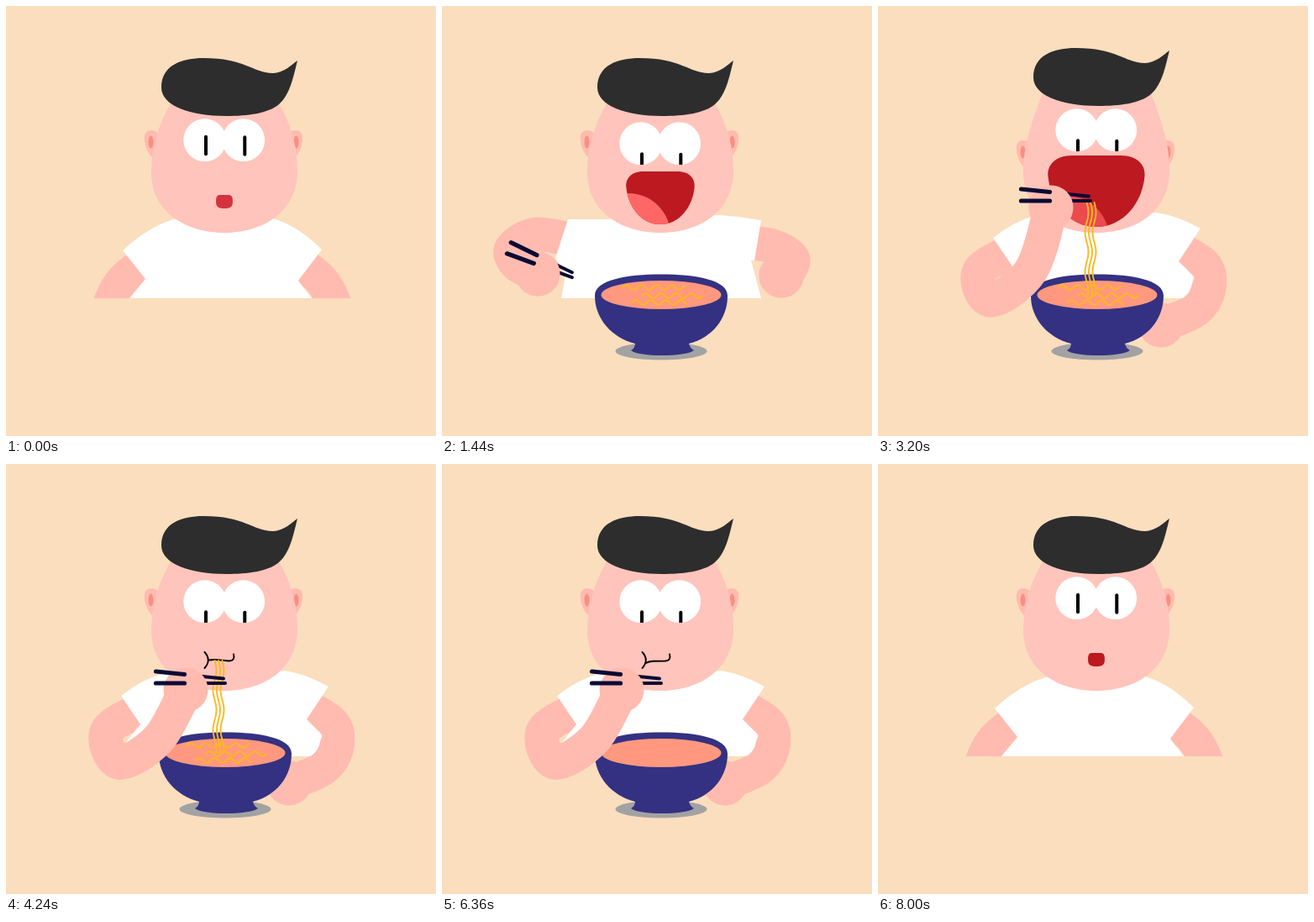
These frames come from a looping animation (512 by 512 pixels, 8.04 s). An HTML page with a canvas:

```html
<!DOCTYPE html>
<html lang="en">
<head>
<meta charset="utf-8">
<title>Noodle lunch</title>
<style>
html, body { margin: 0; width: 100%; height: 100%; overflow: hidden; background: #fadebd; }
canvas { display: block; width: 100vmin; height: 100vmin; }
</style>
</head>
<body>
<canvas id="stage"></canvas>
<script>
const SIZE = 512, LOOP = 8040, TABLE = 348;
const canvas = document.getElementById('stage');
const scale = window.devicePixelRatio || 1;
canvas.width = canvas.height = SIZE * scale;
const c = canvas.getContext('2d');

const SKIN = '#ffbbb0', FACE = '#ffc4bb', NOODLE = '#fcb91f', STICK = '#0b0a35';

// Arm poses: shoulder, three points round the elbow, hand
const LEFT = {
  rest: [187,292, 141,325, 121,362, 112,395, 112,422],
  out: [160,280, 112,272, 83,289, 90,308, 114,319],
  dip: [174,286, 108,320, 114,352, 160,360, 207,342],
  lift: [174,286, 121,315, 134,350, 182,315, 206,240],
  chew: [174,286, 121,317, 134,355, 181,328, 214,269]
};
const RIGHT = {
  rest: [328,292, 374,325, 394,362, 403,395, 403,422],
  out: [352,280, 393,286, 416,299, 415,312, 404,321],
  hold: [348,284, 388,308, 394,335, 378,362, 337,380]
};
// Shirt: neck, sleeve top, sleeve bottom, armpit, hip, then back up the other side
const SHIRT = {
  rest: [203,253, 139,291, 166,325, 166,325, 147,348, 364,348, 348,327, 348,327, 376,290, 318,253],
  out: [192,254, 150,254, 135,300, 147,320, 142,348, 380,348, 368,303, 372,303, 380,255, 330,249],
  hold: [190,249, 137,276, 160,310, 143,331, 143,348, 380,348, 376,322, 358,304, 384,265, 332,246]
};
// Mouth: half width, top, height
const MOUTH = { small: [10,225,16], open: [41,197,63], wide: [58,178,85], shut: [15,231,4] };

const seq = (poses, text) => text.split(' ').map(s => {
  const [time, name] = s.split(':');
  return [+time, poses[name]];
});
const leftSeq = seq(LEFT, '0:rest 500:rest 1150:out 1650:out 2350:dip 2600:dip 3130:lift 3400:lift 3900:chew 6740:chew 7200:out 7480:out 7960:rest');
const bodyTimes = '0:rest 500:rest 1150:out 1650:out 2350:hold 6740:hold 7200:out 7480:out 7960:rest';
const rightSeq = seq(RIGHT, bodyTimes), shirtSeq = seq(SHIRT, bodyTimes);
const mouthSeq = seq(MOUTH, '0:small 850:small 1250:open 2600:open 3130:wide 3400:wide 3760:shut 6800:shut 7000:small');

const clamp = v => Math.max(0, Math.min(1, v));
const smooth = u => u * u * (3 - 2 * u);
const mix = (a, b, u) => a + (b - a) * u;
const ramp = (t, a, b) => smooth(clamp((t - a) / (b - a)));

function pose(track, t) {
  let i = 0;
  while (i < track.length - 1 && t >= track[i + 1][0]) i++;
  if (i === track.length - 1) return track[i][1];
  const [t0, a] = track[i], [t1, b] = track[i + 1];
  const u = ramp(t, t0, t1);
  return a.map((v, k) => mix(v, b[k], u));
}

function fill(color, path) {
  c.fillStyle = color;
  c.fill(new Path2D(path));
}
function oval(x, y, rx, ry, color) {
  c.beginPath();
  c.ellipse(x, y, rx, ry, 0, 0, Math.PI * 2);
  c.fillStyle = color;
  c.fill();
}
function line(width, color, ...p) {
  c.beginPath();
  c.moveTo(p[0], p[1]);
  for (let i = 2; i < p.length; i += 2) c.lineTo(p[i], p[i + 1]);
  c.lineWidth = width;
  c.strokeStyle = color;
  c.stroke();
}

// Smooth limb through the points from index `first`, ending in a round hand
function arm(p, first) {
  const at = i => { i = Math.max(0, Math.min(4, i)); return [p[2 * i], p[2 * i + 1]]; };
  c.beginPath();
  c.moveTo(...at(first));
  for (let i = first; i < 4; i++) {
    const [a, b, d, e] = [at(i - 1), at(i), at(i + 1), at(i + 2)];
    c.bezierCurveTo(b[0] + (d[0] - a[0]) / 6, b[1] + (d[1] - a[1]) / 6,
      d[0] - (e[0] - b[0]) / 6, d[1] - (e[1] - b[1]) / 6, d[0], d[1]);
  }
  c.lineWidth = 41;
  c.strokeStyle = SKIN;
  c.stroke();
  oval(p[8], p[9], 26.5, 26.5, SKIN);
}

function shirt(p) {
  const curve = (x0, y0, x1, y1) =>
    c.quadraticCurveTo((x0 + x1) / 2, (y0 + y1) / 2 - .28 * Math.abs(y1 - y0), x1, y1);
  c.beginPath();
  c.moveTo(p[0], p[1]);
  curve(p[0], p[1], p[2], p[3]);
  for (let i = 4; i < 18; i += 2) c.lineTo(p[i], p[i + 1]);
  curve(p[16], p[17], p[18], p[19]);
  c.fillStyle = '#fff';
  c.fill();
}

function head(tilt, look) {
  const up = 12 * tilt;
  const top = 116 - up;
  for (const side of [1, -1]) {
    c.save();
    c.translate(259, up);
    c.scale(side, 1);
    fill(SKIN, 'M-94 160C-95 151 -91 148 -86 148C-82 148 -79 150 -78 152V184C-86 182 -93 172 -94 160Z');
    oval(-86.5, 162, 3, 7.5, '#fa8f80');
    c.restore();
  }
  fill(FACE, `M196 ${top}C180 145 173 170 173 198C173 246 215 270 260 270` +
    `C306 270 347 245 347 196C347 168 340 143 325 ${top}Z`);
  c.save();
  c.translate(0, -up);
  fill('#2d2d2d', 'M185 97C185 70 210 62 235 62C285 62 292 79 318 80C330 80 340 70 347 65' +
    'C342 85 338 106 325 117C312 128 288 131 262 131C220 131 185 119 185 97Z');
  c.restore();

  const eyeY = 159.7 + 4 * look - 16 * tilt;
  const eyes = new Path2D();
  eyes.arc(236.7, eyeY, 25.4, 0, 7);
  eyes.moveTo(308, eyeY);
  eyes.arc(282.7, eyeY, 25.4, 0, 7);
  c.save();
  c.fillStyle = '#fff';
  c.fill(eyes);
  c.clip(eyes);
  const y = eyeY - 4 + 16.5 * look;
  line(4, '#000', 238, y, 238, y + 20.5);
  line(4, '#000', 284.3, y + .5, 284.3, y + 21);
  c.restore();
}

function mouth(t, tilt) {
  if (t > 3760 && t < 6800) {
    const k = -Math.cos((t - 4240) / 606 * Math.PI * 2);
    c.lineWidth = 1.9;
    c.strokeStyle = '#000';
    c.stroke(new Path2D(`M${237.5 + k} 224Q${246 + k} 233.5 ${237.5 + k} 243`));
    c.stroke(new Path2D(`M242 ${235.5 + 2 * k}Q246 ${233.8 + k} 252 ${234 + k * .8}L266 234.5Q273 234 271 226.5`));
    return;
  }
  const [w, top, h] = pose(mouthSeq, t);
  const square = clamp((41 - w) / 31);
  const shape = new Path2D();
  const pt = (u, v) => [260 + u * w, top + v * h];
  const side = mix(.3, .5, square);
  const corner = [mix(.94, 1, square), mix(.66, .85, square)];
  const base = mix(.56, .8, square);
  shape.moveTo(...pt(-.5, 0));
  shape.lineTo(...pt(.5, 0));
  shape.bezierCurveTo(...pt(.85, 0), ...pt(1.02, .14), ...pt(.99, side));
  shape.bezierCurveTo(...pt(...corner), ...pt(base, 1), ...pt(0, 1));
  shape.bezierCurveTo(...pt(-base, 1), ...pt(-corner[0], corner[1]), ...pt(-.99, side));
  shape.bezierCurveTo(...pt(-1.02, .14), ...pt(-.85, 0), ...pt(-.5, 0));
  const u = ramp(t, 0, 900);
  c.save();
  c.fillStyle = `rgb(${mix(213, 189, u)},${mix(50, 25, u)},${mix(62, 33, u)})`;
  c.fill(shape);
  c.clip(shape);
  if (w > 18) {
    const r = 50 * Math.min(1, w / 41);
    oval(mix(222, 225, tilt), top + h + 13, r, r, `rgb(${mix(255, 235, tilt)},${mix(103, 74, tilt)},${mix(102, 78, tilt)})`);
  }
  c.restore();
}

function bowl(dy, left) {
  c.save();
  c.translate(0, dy);
  oval(261, 411, 54.5, 10.5, '#a3a2a3');
  fill('#343182', 'M182 345C182 326 220 319.5 261 319.5C302 319.5 340 326 340 345' +
    'C340 372 322 395 294 402Q295 407 300 410C290 418 234 418 225 410Q230 407 230 402C202 395 182 372 182 345Z');
  oval(261, 344, 71.5, 17, '#ff987e');
  for (const [x, y, len] of [[215, 335, 74], [238, 345, 72], [226, 353, 66]]) {
    const end = len * left, p = [];
    for (let d = 0; d <= end; d += 2) p.push(x + d, y - 3 * Math.sin(d / 18 * Math.PI * 2));
    if (p.length > 2) line(1.9, NOODLE, ...p);
  }
  c.restore();
}

function strand(t, tip) {
  if (t < 2600 || t > 6150) return;
  const top = t < 3130 ? tip[1] : 234;
  const x = t < 3130 ? tip[0] + 2 : 253;
  const bottom = mix(345, 234, ramp(t, 5450, 6100));
  const slide = Math.max(0, t - 4240) * .06;
  for (let i = -1; i <= 1; i++) {
    const p = [];
    for (let y = top; y <= bottom; y += 2)
      p.push(x + i * 4.5 + 2 * Math.sin((y + slide - 234) / 7.5), y);
    if (p.length > 2) line(1.9, NOODLE, ...p);
  }
}

function sticks(at, rot, back) {
  c.save();
  c.translate(at[0], at[1]);
  c.rotate(rot);
  if (back) {
    line(4, STICK, -10, -19, 45, -13.5);
    line(4, STICK, -10, -8, 47, -8);
  } else {
    line(5.2, STICK, -35.5, -22, -1.5, -18.5);
    line(5.2, STICK, -35.5, -8, -1.5, -8);
  }
  c.restore();
}

function atTable(t, paint) {
  c.save();
  if (t < 1500 || t > 7230) {
    c.beginPath();
    c.rect(0, 0, SIZE, TABLE);
    c.clip();
  }
  paint();
  c.restore();
}

function draw(t) {
  c.setTransform(scale, 0, 0, scale, 0, 0);
  c.fillStyle = '#fadebd';
  c.fillRect(0, 0, SIZE, SIZE);
  c.lineCap = c.lineJoin = 'round';

  const left = pose(leftSeq, t).slice(), right = pose(rightSeq, t);
  const tilt = ramp(t, 2620, 3130) - ramp(t, 3400, 3850);
  const look = ramp(t, 400, 1000) - ramp(t, 7100, 7550);
  if (t > 4240 && t < 6360) {
    const bob = Math.sin((t - 4240) / 530 * Math.PI) ** 2;
    left[8] -= 4 * bob;
    left[9] -= 5 * bob;
  }
  const turn = 1 - ramp(t, 2600, 3130) + ramp(t, 6740, 7200);
  const rot = turn * .35;
  const grip = [left[8] - 6 * turn, left[9] - 4.5 * turn];
  const tip = [grip[0] + 46 * Math.cos(rot) + 8 * Math.sin(rot),
    grip[1] + 46 * Math.sin(rot) - 8 * Math.cos(rot)];
  const rise = clamp((t - 40) / 760), drop = clamp((t - 7350) / 610);
  const bowlY = 200 * ((1 - rise) ** 3 + drop ** 2);

  atTable(t, () => { arm(right, 0); arm(left, 0); });
  shirt(pose(shirtSeq, t));
  atTable(t, () => arm(right, 2));
  head(tilt, look);
  mouth(t, tilt);
  bowl(bowlY, 1 - ramp(t, 4700, 5800));
  strand(t, tip);
  atTable(t, () => {
    sticks(grip, rot, true);
    arm(left, 2);
    sticks(grip, rot, false);
  });
}

const start = performance.now();
function tick() {
  draw((performance.now() - start) % LOOP);
  requestAnimationFrame(tick);
}
tick();
</script>
</body>
</html>
```
